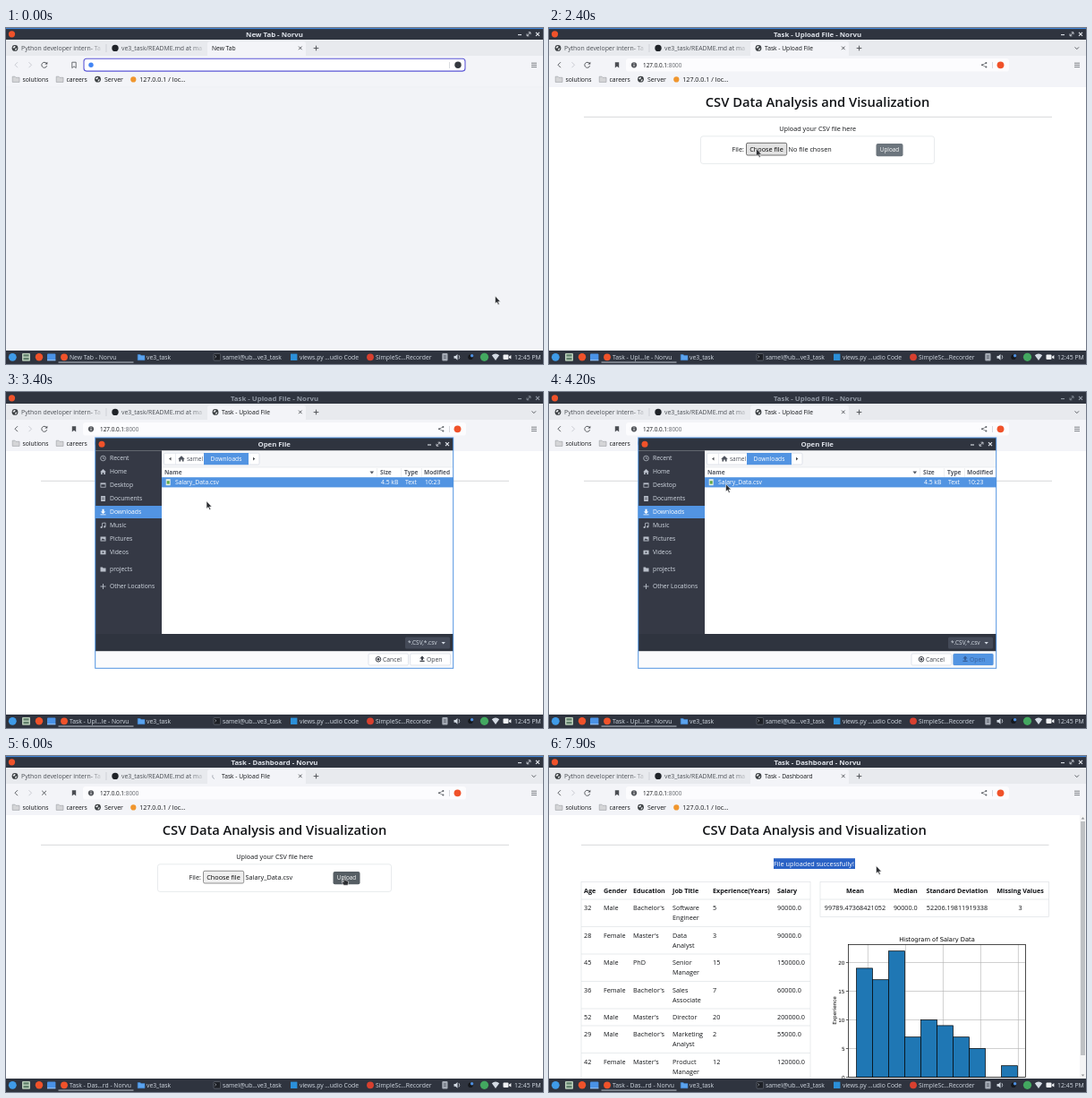
An HTML page for the animation above (8 s loop, 600 px wide and 375 px high).

```html
<!DOCTYPE html>
<html lang="en">
<head>
<meta charset="utf-8">
<title>CSV upload demo</title>
<style>
  html, body { margin: 0; width: 100%; height: 100%; overflow: hidden; background: #f3f4f8; }
  svg { display: block; width: 600px; height: 375px; }
  text { font-family: "Open Sans", "Noto Sans", sans-serif; white-space: pre; }
  .page { font-weight: 500; }
  .plot { font-weight: 400; }
  .plot text { font-family: "DejaVu Sans", sans-serif; }
</style>
</head>
<body>
<svg id="stage" viewBox="0 0 600 375" xmlns="http://www.w3.org/2000/svg"></svg>
<script>
const LOOP = 8000, STEP = 100;
const DARK = '#2f343f', SIDE = '#353945', BLUE = '#5294e2', ORANGE = '#f0522a';
const INK = '#121417', GREY = '#4a4d52', BAR = '#f3f4f8', STRIP = '#e8eaee', RULE = '#dee2e6';
const BROWSER = 'Norvu', USER = 'samel';

// Moments when the picture switches
const GO = 1000, READY = 1400, ASK = 2600, PICKED = 4100, CLOSED = 4300,
      SEND = 5700, RENAMED = 5900, DASH = 6100, DONE = 6200;

const rect = (x, y, w, h, fill, more = '') =>
  `<rect x="${x}" y="${y}" width="${w}" height="${h}" fill="${fill}" ${more}/>`;
const dot = (x, y, r, fill, more = '') => `<circle cx="${x}" cy="${y}" r="${r}" fill="${fill}" ${more}/>`;
const line = (d, stroke = GREY, w = 0.8, more = '') =>
  `<path d="${d}" fill="none" stroke="${stroke}" stroke-width="${w}" ${more}/>`;
const shape = (d, fill) => `<path d="${d}" fill="${fill}"/>`;
// Text placed by the middle of its capitals
const text = (x, mid, s, size = 6.9, fill = INK, more = '') =>
  `<text x="${x}" y="${(mid + size * 0.357).toFixed(2)}" font-size="${size}" fill="${fill}" ${more}>${s}</text>`;
const MID = 'text-anchor="middle"', BOLD = 'font-weight="700"';
const at = (spans, ...parts) => `<g data-at="${spans}">${parts.join('')}</g>`;
const move = (x, y, s) => `<g transform="translate(${x} ${y})">${s}</g>`;

const globe = (x, y) => dot(x, y, 3.4, '#3c4043') +
  shape(`M${x - 2.4} ${y - .6}l1.6 -1.7 1.5 .3 -.6 1.4 -1.4 1z M${x + .3} ${y + .6}l2 -.5 -.6 1.7 -1.4 .8z`, '#eceef1');
const folder = (x, y, fill, edge) =>
  `<path d="M${x - 3.8} ${y - 3}h2.8l1 1.1h4v5.1h-7.8z" fill="${fill}" stroke="${edge}" stroke-width=".6"/>`;
const winButtons = (x, y, c) =>
  line(`M${x - 2} ${y + .8}h4`, c, 1.1) +
  line(`M${x + 9.6} ${y - 2}h2.4v2.4 M${x + 8} ${y - .4}v2.4h2.4 M${x + 8.2} ${y + 1.8}l3.6 -3.6`, c, .8) +
  line(`M${x + 18} ${y - 2}l4 4m0 -4l-4 4`, c, 1.2);

function windowBar() {
  const names = [['New Tab', 0, READY], ['Task - Upload File', READY, RENAMED], ['Task - Dashboard', RENAMED, LOOP]];
  const titles = fill => names.map(([s, a, b]) =>
    at(`${a}-${b}`, text(300, 6.9, `${s} - ${BROWSER}`, 7.8, fill, `${MID} ${BOLD}`))).join('');
  return rect(0, 0, 600, 13, DARK) + dot(6.5, 6.8, 3.6, ORANGE) +
    at(`0-${ASK},${CLOSED}-${LOOP}`, rect(0, 0, 600, 1.1, '#4084d6'), titles('#dfe3ea'), winButtons(574, 6.8, '#dfe3ea')) +
    at(`${ASK}-${CLOSED}`, titles('#9097a3'), winButtons(574, 6.8, '#9097a3'));
}

function tabs() {
  const fade = (x, w) => rect(x, 16, w, 14, 'url(#fade)');
  const busy = `${GO}-${READY},${SEND}-${DONE}`;
  return rect(0, 13, 600, 18.5, STRIP) +
    rect(225, 15, 110, 18, BAR, 'rx="2.5"') +
    line('M112 18v9', '#c5c8cd', .7) +
    globe(10, 22.4) + text(17, 22.4, 'Python developer intern- Ta', 6.9, '#4b4f55') + fade(93, 16) +
    dot(122, 22.4, 3.7, '#1f2328') + text(129, 22.4, 've3_task/README.md at ma', 6.9, '#4b4f55') + fade(206, 17) +
    at(`0-${GO}`, text(230, 22.4, 'New Tab', 6.7)) +
    at(`${GO}-${READY}`, text(239.5, 22.4, 'New Tab', 6.7)) +
    at(`${READY}-${DASH}`, text(241, 22.4, 'Task - Upload File', 6.7)) +
    at(`${DASH}-${LOOP}`, text(241, 22.4, 'Task - Dashboard', 6.7)) +
    at(busy, `<g id="spin">${line('M0 -3.3A3.3 3.3 0 0 1 3.3 0', '#a9adb5', .9)}</g>`) +
    at(`${READY}-${SEND},${DONE}-${LOOP}`, globe(234, 22.4)) +
    line('M327 20.6l3.6 3.6m0 -3.6l-3.6 3.6', GREY, .9) +
    line('M346.5 19.7v5.6m-2.8 -2.8h5.6', GREY, .9) +
    at(`${READY}-${LOOP}`, line('M587.6 21.4l2.2 2.2 2.2 -2.2', GREY, .9));
}

function toolbar() {
  const busy = `${GO}-${READY},${SEND}-${DONE}`;
  const calm = `0-${GO},${READY}-${SEND},${DONE}-${LOOP}`;
  const mark = 'M73.8 38.2h4.4v6.4l-2.2 -1.8l-2.2 1.8z';
  const back = 'M13 38.2l-3 3 3 3';
  return rect(0, 31, 600, 35, BAR) +
    at(`0-${READY}`, line(back, '#c4c7cd', .9)) +
    at(`${READY}-${LOOP}`, line(back, GREY, .9)) +
    line('M25.5 38.2l3 3 -3 3', '#c4c7cd', .9) +
    at(calm, line('M45.3 39.6A3 3 0 1 0 45.7 42.2', GREY, .9), shape('M46.3 37.7v2.9h-2.9z', GREY)) +
    at(busy, line('M40.2 38.8l4.8 4.8m0 -4.8l-4.8 4.8', GREY, .9)) +
    at(`0-${GO}`, line(mark, GREY, .8), rect(87, 34.3, 426, 13.8, '#fff', 'rx="3" stroke="#5b57d6" stroke-width="1.1"'),
      dot(95, 41.3, 2.7, '#4285f4')) +
    at(`${GO}-${LOOP}`, shape(mark, GREY), rect(86, 34, 428, 14.4, '#fcfcfe', 'rx="3"'),
      dot(95, 41.3, 3.1, '#54575c'), line('M95 40.8v2.2', '#fff', .8), dot(95, 39.7, .5, '#fff'),
      text(105, 41.3, '127.0.0.1<tspan fill="#5f6368">:8000</tspan>', 6.4)) +
    line('M495.5 38v7', '#c9ccd2', .7) +
    at(`0-${READY}`, dot(505, 41.3, 3.7, '#34383f')) +
    at(`${READY}-${LOOP}`, line('M488.3 39l-4.3 2.3 4.3 2.3', '#5f6368', .7),
      dot(488.4, 39, 1, '#5f6368'), dot(484, 41.3, 1, '#5f6368'), dot(488.4, 43.6, 1, '#5f6368'), dot(504.5, 41.3, 3.9, ORANGE)) +
    line('M587 39.2h6m-6 2.2h6m-6 2.2h6', '#5f6368', .8) +
    at('800-1600', rect(96.5, 51.3, 37, 12.3, '#d3d5d9', 'rx="3"')) +
    folder(11, 57.2, '#d4d5d7', '#9a9da2') + text(18.5, 57.2, 'solutions', 6.8) +
    folder(60, 57.2, '#d4d5d7', '#9a9da2') + text(67.5, 57.2, 'careers', 6.8) +
    globe(102.5, 57.2) + text(110, 57.2, 'Server', 7) +
    dot(142.3, 57.4, 3.1, '#f0962e') + text(149.3, 57.2, '127.0.0.1 / loc…', 7.1);
}

const heading = (x, left, right) =>
  text(x, 82.7, 'CSV Data Analysis and Visualization', 14.7, INK, `${MID} font-weight="600"`) +
  line(`M${left} 99.3H${right}`, '#c6c8cb', .7);

function uploadPage() {
  const button = (a, fill, edge) => at(a, rect(220.5, 128.3, 45.2, 13.7, fill, `rx="1.6" stroke="${edge}" stroke-width=".8"`));
  return rect(0, 66, 600, 294, '#fff') + heading(300, 39, 562) +
    text(300.2, 112.6, 'Upload your CSV file here', 7.25, INK, MID) +
    rect(169.5, 120.8, 261, 30.6, '#fff', `rx="2.5" stroke="${RULE}" stroke-width=".7"`) +
    text(204.5, 135.2, 'File:', 7.25) +
    button(`0-2200,${ASK}-${LOOP}`, '#efefef', '#767676') + button(`2200-${ASK}`, '#e2e2e2', '#4f4f4f') +
    text(243, 135.2, 'Choose file', 7.3, '#000', MID) +
    at(`0-${CLOSED}`, text(267.6, 135.2, 'No file chosen', 7.25)) +
    at(`${CLOSED}-${LOOP}`, text(267.6, 135.2, 'Salary_Data.csv', 7.3)) +
    at('0-5500', rect(365.5, 129, 30, 14.3, '#6c757d', 'rx="2"')) +
    at(`5500-${LOOP}`, rect(365.5, 129, 30, 14.3, '#565e64', 'rx="2"')) +
    text(380.5, 136.1, 'Upload', 6.4, '#fff', MID);
}

const COLS = [39, 61, 94, 138, 183, 255];
const PEOPLE = [
  ['32', 'Male', "Bachelor's", 'Software Engineer', '5', '90000.0'],
  ['28', 'Female', "Master's", 'Data Analyst', '3', '90000.0'],
  ['45', 'Male', 'PhD', 'Senior Manager', '15', '150000.0'],
  ['36', 'Female', "Bachelor's", 'Sales Associate', '7', '60000.0'],
  ['52', 'Male', "Master's", 'Director', '20', '200000.0'],
  ['29', 'Male', "Bachelor's", 'Marketing Analyst', '2', '55000.0'],
  ['42', 'Female', "Master's", 'Product Manager', '12', '120000.0'],
];

function peopleTable() {
  let out = rect(36, 140.6, 256, 240, '#fff', `stroke="${RULE}" stroke-width=".7"`);
  ['Age', 'Gender', 'Education', 'Job Title', 'Experience(Years)', 'Salary']
    .forEach((s, i) => out += text(COLS[i], 150.4, s, 7.2, INK, BOLD));
  let y = 160;
  for (const row of PEOPLE) {
    out += line(`M36 ${y}H292`, RULE, .7);
    row.forEach((s, i) => (i === 3 ? s.split(' ') : [s])
      .forEach((word, n) => out += text(COLS[i], y + 9.5 + n * 11.4, word, 7.25)));
    y += row[3].includes(' ') ? 30.5 : 19;
  }
  return out;
}

function statsTable() {
  const cols = [[342, 'Mean', '99789.47368421052'], [398.3, 'Median', '90000.0'],
    [456, 'Standard Deviation', '52206.19811919338'], [526.5, 'Missing Values', '3']];
  return rect(303, 140.6, 255.5, 39, '#fff', `stroke="${RULE}" stroke-width=".7"`) +
    line('M303 160H558.5', RULE, .7) +
    cols.map(([x, head, value]) => text(x, 150.4, head, 7.2, INK, `${MID} ${BOLD}`) +
      text(x, 169.7, value, 7.25, INK, MID)).join('');
}

function histogram() {
  const level = n => 358.5 - 6.4 * n;
  let out = text(433.5, 204.2, 'Histogram of Salary Data', 6.7, '#000', MID);
  for (let k = 0; k < 5; k++) out += line(`M${356.4 + 42 * k} 210.5V358`, '#b0b0b0', .6);
  for (let n = 0; n <= 20; n += 5) {
    out += line(`M334 ${level(n)}H532`, '#b0b0b0', .6) + line(`M331.8 ${level(n)}h2.2`, '#000', .6) +
      text(330.5, level(n), n, 5.7, '#000', 'text-anchor="end"');
  }
  [19, 17, 22, 7, 10, 9, 7, 5, 0, 2].forEach((n, i) =>
    out += rect(343.5 + 18 * i, level(n), 18, 6.4 * n, '#1f77b4', 'stroke="#000" stroke-width=".7"'));
  out += rect(334.4, 210.5, 198.2, 148, 'none', 'stroke="#000" stroke-width=".7"');
  out += text(0, 0, 'Experience', 5.7, '#000', `${MID} transform="translate(318.5 284) rotate(-90)"`);
  return `<g class="plot">${out}</g>`;
}

function dashboard() {
  const note = fill => text(251, 120, 'File uploaded successfully!', 7.3, fill);
  return rect(0, 66, 600, 294, '#fff') + heading(296.5, 36, 558.5) + note(INK) +
    `<g clip-path="url(#picked)">${rect(251, 114.2, 91, 11.8, '#2a62c5')}${note('#fff')}</g>` +
    peopleTable() + statsTable() + histogram() +
    rect(593, 66, 7, 294, '#f4f4f5') + shape('M596.5 68.2l1.8 2.2h-3.6z M596.5 357.6l1.8 -2.2h-3.6z', '#8b8d90') +
    rect(594, 73, 5, 261, '#bfc1c4');
}

function dialog() {
  const c = '#b9bfca';
  const icons = {
    Recent: dot(0, 0, 2.8, 'none', `stroke="${c}" stroke-width=".8"`) + line('M0 -1.6V.2h1.5', c, .7),
    Home: shape('M-3.4 .2L0 -3 3.4 .2H2.4V3H.8V1H-.8V3H-2.4V.2z', c),
    Desktop: rect(-3, -2.6, 6, 5.2, c) + rect(-2.2, -.8, 4.4, 2.6, SIDE),
    Documents: rect(-2.4, -3, 4.8, 6, c) + line('M-1.4 -1h2.8m-2.8 1.6h2.8', SIDE, .6),
    Downloads: shape('M-1 -3.2H1V-.4H2.8L0 2 -2.8 -.4H-1z M-3 2.4h6v.9h-6z', '#fff'),
    Music: line('M-1 2V-2.6L2.6 -3v4.3', c, .8) + dot(-1.9, 2, 1.1, c) + dot(1.7, 1.4, 1.1, c),
    Pictures: rect(-3, -2.5, 6, 5, c) + shape('M-2.2 1.6L-.6 -.8.6 .6 1.3 0 2.3 1.6z', SIDE),
    Videos: rect(-3, -2.3, 6, 4.6, c) + shape('M-.8 -1.3L1.4 0 -.8 1.3z', SIDE),
    projects: shape('M-3 -2.4h2.3l.8 .9H3v4H-3z', c),
    'Other Locations': line('M0 -3v6m-3 -3h6', c, .9),
  };
  const places = Object.entries(icons).map(([name, icon], i) => {
    const y = i < 8 ? 74 + 15 * i : 198 + 19 * (i - 8);
    const on = name === 'Downloads';
    return (on ? rect(100, 127, 74, 14, BLUE) : '') + move(108.5, y, icon) + text(116, y, name, 6.75, on ? '#fff' : '#d3dae3');
  }).join('');
  const edge = 'rx="1.5" stroke="#d3d8e2" stroke-width=".7"';
  const label = ink => shape('M465 294.6l2.7 3h-1.7v1.6h-2v-1.6h-1.7z M462.4 299.8h5.2v1.2h-5.2z', ink) + text(470, 298.3, 'Open', 6.8, ink);
  const cells = [[189, 'Salary_Data.csv'], [419, '4.5 kB'], [446, 'Text'], [468, '10:23']];
  const heads = [[177, 'Name'], [418, 'Size'], [445, 'Type'], [467, 'Modified']];
  return rect(99.5, 51, 400.5, 257.5, '#fbfbfc') +
    rect(100, 51, 400, 14.5, DARK) + dot(107, 58.2, 3.5, ORANGE) +
    text(299.7, 58.2, 'Open File', 7.8, '#dfe3ea', `${MID} ${BOLD}`) + winButtons(473, 58.2, '#dfe3ea') +
    rect(100, 65.5, 74, 205, SIDE) + places +
    rect(174, 65.5, 326, 18.5, '#f5f6f8') +
    rect(176.5, 68.2, 106.5, 12.8, '#fff', edge) + rect(221, 68, 50, 13.2, BLUE) +
    line('M189.5 68.5v12.3', '#dcdfe6', .6) +
    shape('M184.5 72.8v3.6l-2.4 -1.8z M276 72.8v3.6l2.4 -1.8z', GREY) +
    move(196, 74.5, shape('M-3.8 .2L0 -3.2 3.8 .2H2.6V3H.8V1H-.8V3H-2.6V.2z', '#4d525c')) +
    text(202, 74.6, USER, 6.5, '#4d525c') + text(246, 74.6, 'Downloads', 6.7, '#fff', MID) +
    rect(174, 84, 326, 186.5, '#fff') + line('M174 84h326', '#dfe2e8', .6) +
    heads.map(([x, s]) => text(x, 89.8, s, 6.6, '#555a64', BOLD)).join('') +
    line('M414.5 85v10M441.5 85v10M464.5 85v10', '#e2e4e9', .6) +
    shape('M406.5 88.6h4.6l-2.3 2.8z', '#555a64') +
    rect(174, 95.2, 326, 11.2, BLUE) + rect(178.7, 97.2, 5, 7, '#e7f1e2') + rect(179.7, 99.2, 3, 3.4, '#5fa64a') +
    cells.map(([x, s]) => text(x, 100.8, s, 6.8, '#fff')).join('') +
    rect(100, 270, 400, 19.2, DARK) +
    rect(446, 273.5, 50, 13, '#444a58', 'rx="1.5"') + text(449, 280, '*.CSV,*.csv', 6.5, '#d3dae3') +
    shape('M486.5 279h4.4l-2.2 2.6z', '#d3dae3') +
    rect(405, 292, 44.5, 13, '#fff', edge) +
    dot(416, 298.3, 2.8, 'none', 'stroke="#3b3f47" stroke-width="1"') + dot(416, 298.3, 1.4, '#3b3f47') +
    text(421, 298.3, 'Cancel', 6.8, '#3b3f47') +
    rect(451.5, 292, 45, 13, '#fff', edge) +
    at(`0-${PICKED}`, label('#3b3f47')) +
    at(`${PICKED}-${LOOP}`, rect(451.5, 292, 45, 13, BLUE, 'rx="1.5"'), label('#355f9b')) +
    rect(99.7, 51, 400, 257.3, 'none', `stroke="${BLUE}" stroke-width="1"`);
}

function taskbar() {
  const c = '#d3dae3', y = 367.3;
  const task = (x, s) => text(x, y, s, 6.8, c);
  return rect(0, 360, 600, 15, DARK) +
    dot(7.3, y, 4.4, '#3f9be8') +
    rect(18, 363, 9, 8.8, '#b9cdb9', 'rx="1"') + rect(19.5, 364.3, 6, 2.3, '#5f7f6a') + rect(19.5, 368, 6, 2.3, '#5f7f6a') +
    dot(37, y, 4.2, ORANGE) +
    rect(46, 363.6, 9.4, 7.4, '#4a92e6', 'rx="1"') + rect(46, 370, 9.4, 1.4, '#84b8f2') +
    rect(58.5, 372.6, 84, .9, '#cfd6e0') +
    dot(65, y, 3.9, ORANGE) +
    at(`0-${READY}`, task(71, `New Tab - ${BROWSER}`)) +
    at(`${READY}-${RENAMED}`, task(71, `Task - Upl…le - ${BROWSER}`)) +
    at(`${RENAMED}-${LOOP}`, task(71, `Task - Das…rd - ${BROWSER}`)) +
    folder(151, y + .2, '#5ba3ee', '#3f83cf') + task(157, 've3_task') +
    rect(232, 363.5, 7.6, 7.6, '#1d2026', 'rx="1" stroke="#6d737e" stroke-width=".6"') + line('M233.5 365.5l1.4 1.3 -1.4 1.3', c, .6) +
    task(242, `${USER}@ub…ve3_task`) +
    rect(318, 363.6, 7.4, 7.4, '#2b8fd8') + task(328, 'views.py …udio Code') +
    dot(407, y, 3.9, '#d8402f') + task(413, 'SimpleSc…Recorder') +
    rect(487.3, 363, 6.2, 8.6, '#a6acb6', 'rx="1"') + line('M489 366h2.8m-2.8 2.2h2.8', DARK, .7) +
    shape('M500.5 366h1.8l2.2 -2v6.8l-2.2 -2h-1.8z', c) + line('M506 365.2q1.6 2.1 0 4.2', c, .8) +
    dot(519, y, 2.8, '#15181d') + dot(520.6, y - 1.6, 1.7, '#4d8fe0') +
    dot(534.5, y, 4.6, '#43a860') +
    shape('M542.8 365.3q4.2 -3.4 8.4 0L547 371z', c) +
    rect(555.5, 364.6, 6, 5.4, '#f0f2f5', 'rx="1"') + shape('M562 366.8l2.4 -1.7v4.4L562 367.9z', '#f0f2f5') +
    text(568, y, '12:45 PM', 6.9, c);
}

const pointers =
  `<g id="mouse" stroke="#fff" stroke-width=".55" fill="#2b2d31">
    <path id="arrow" d="M0 0V8.6L2 6.9 3.4 9.9 4.8 9.2 3.4 6.4H6z"/>
    <path id="hand" d="M-.8 -.6Q0 -1.6 .8 -.6V2.6L4 3.4Q4.9 3.8 4.7 5L4 8.2H-.6L-3 4.8Q-2.6 3.6 -.8 4.8z"/>
    <path id="beam" d="M-1.6 -4H1.6M0 -4V4M-1.6 4H1.6" stroke="#222" stroke-width=".8" fill="none"/>
  </g>`;

const page = (span, s) => `<g class="page">${at(span, s)}</g>`;
const stage = document.getElementById('stage');
stage.innerHTML =
  `<defs>
    <linearGradient id="fade"><stop offset="0" stop-color="${STRIP}" stop-opacity="0"/><stop offset="1" stop-color="${STRIP}"/></linearGradient>
    <clipPath id="picked"><rect id="span" x="251" y="113" width="0" height="14"/></clipPath>
  </defs>` +
  rect(0, 0, 600, 375, '#f2f3f7') + tabs() + toolbar() +
  at(`0-${READY}`, line('M0 66h600', '#ebecf0', .6)) +
  page(`${READY}-${DASH}`, uploadPage()) + page(`${DASH}-${LOOP}`, dashboard()) +
  windowBar() + at(`${ASK}-${CLOSED}`, dialog()) + taskbar() + pointers;

// Pointer stops: time, x, y
const PATH = [[0, 546.5, 299], [100, 546.5, 299], [900, 117.5, 59], [1400, 117.5, 59], [2200, 231.5, 134.5],
  [2600, 231.5, 134.5], [2800, 230.5, 126.5], [3200, 230.5, 126.5], [3900, 197.5, 102.5], [4600, 197.5, 102.5],
  [5500, 378, 136], [6600, 378, 136], [7500, 251, 120], [7600, 251, 120], [7900, 365.5, 122.5], [LOOP, 365.5, 122.5]];

function pointerAt(t) {
  const i = Math.max(1, PATH.findIndex(p => p[0] > t));
  const [a, b] = [PATH[i - 1], PATH[i]];
  const k = (t - a[0]) / (b[0] - a[0]), e = k * k * (3 - 2 * k);
  return [a[1] + (b[1] - a[1]) * e, a[2] + (b[2] - a[2]) * e];
}

const get = id => document.getElementById(id);
const [mouse, spin, span, arrow, hand, beam] = ['mouse', 'spin', 'span', 'arrow', 'hand', 'beam'].map(get);
const timed = [...stage.querySelectorAll('[data-at]')].map(el =>
  ({ el, spans: el.dataset.at.split(',').map(s => s.split('-').map(Number)) }));
const show = (el, on) => { el.style.display = on ? '' : 'none'; };

function draw(t) {
  for (const { el, spans } of timed) show(el, spans.some(([a, b]) => t >= a && t < b));
  const [x, y] = pointerAt(t);
  mouse.setAttribute('transform', `translate(${x.toFixed(1)} ${y.toFixed(1)})`);
  const overLink = t >= 5500 && t < DASH, overText = t >= 7400 && x < 344;
  show(hand, overLink);
  show(beam, overText);
  show(arrow, !overLink && !overText);
  spin.setAttribute('transform', `translate(234 22.4) rotate(${t * 0.36 - 160})`);
  span.setAttribute('width', t >= 7600 ? Math.min(91, x - 251) : 0);
}

const start = performance.now();
function tick() {
  const t = (performance.now() - start) % LOOP;
  draw(Math.floor(t / STEP) * STEP);
  requestAnimationFrame(tick);
}
tick();
</script>
</body>
</html>
```
